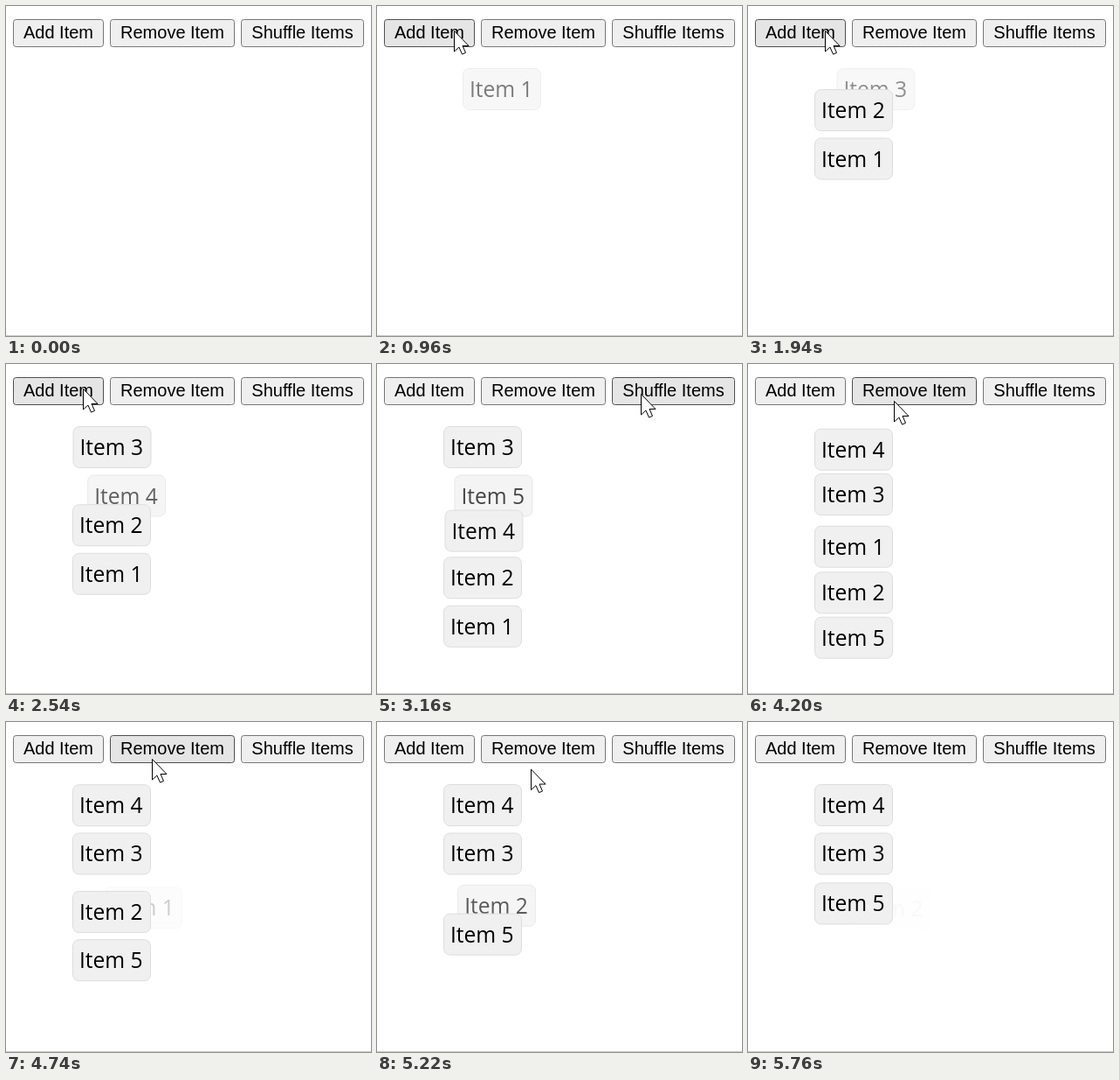
Write an HTML page that moves like this. It is 418 by 377 pixels and loops after 5.82 s.

```html
<!DOCTYPE html>
<html lang="en">
<head>
<meta charset="utf-8">
<title>List transitions</title>
<style>
  html, body { margin: 0; width: 100%; height: 100%; overflow: hidden; background: #fff; }
  svg { display: block; }
  .button text { font: 20px Arial, "Liberation Sans", sans-serif; text-anchor: middle; }
  .button rect { fill: #efefef; stroke: #767676; }
  .button.hover rect { fill: #e5e5e5; stroke: #4f4f4f; }
  .item text { font: 24.6px "Open Sans", sans-serif; }
  .item rect { fill: #f0f0f0; stroke: #ddd; }
</style>
</head>
<body>
<svg id="stage" width="418" height="377" viewBox="0 0 418 377">
  <path d="M0 376.5H418" stroke="#ccc"/>
  <g id="buttons"></g>
  <g id="list"></g>
  <path id="cursor" d="M0 0V23.5L5.4 18.5L9 26.6L13 24.9L9.5 17H16.5Z" fill="#fff" stroke="#000"/>
</svg>
<script>
const LOOP = 5820, TOP = 71, PITCH = 55.5, SHIFT = 45, DROP = 7.5;
const $ = id => document.getElementById(id);

function add(parent, tag, attrs, text = '') {
  const el = document.createElementNS('http://www.w3.org/2000/svg', tag);
  for (const k in attrs) el.setAttribute(k, attrs[k]);
  el.textContent = text;
  return parent.appendChild(el);
}

const buttons = [['Add Item', 8, 104], ['Remove Item', 119, 143], ['Shuffle Items', 269, 141]]
  .map(([label, x, w]) => {
    const el = add($('buttons'), 'g', { class: 'button' });
    add(el, 'rect', { x: x + .5, y: 15.5, width: w - 1, height: 31, rx: 3 });
    add(el, 'text', { x: x + w / 2, y: 37 }, label);
    return { el, x, w };
  });

const items = {};
for (const id of '12345') {
  const el = items[id] = add($('list'), 'g', { class: 'item' });
  add(el, 'rect', { x: .5, y: .5, width: 89, height: 47, rx: 7 });
  add(el, 'text', { x: 8, y: 33 }, 'Item ' + id);
}

// start, duration, list order, leaving item
const actions = [
  [750, 700, '1'],
  [1222, 600, '21'],
  [1783, 600, '321'],
  [2253, 800, '3421'],
  [2730, 1000, '35421'],
  [3350, 1045, '43125'],
  [4268, 944, '43125', '1'],
  [5005, 944, '4325', '2']
];

// time, x, y of the pointer tip
const path = [
  [120, 343, 288], [600, 89, 29], [2780, 89, 29], [3070, 303, 35],
  [3850, 303, 35], [4180, 168, 43], [5180, 168, 43], [5520, 404, 345]
];

const mix = (a, b, p) => a + (b - a) * p;

// cubic-bezier(.25, .1, .25, 1)
function ease(t) {
  if (t >= 1) return 1;
  let lo = 0, hi = 1;
  const curve = (u, a, b) => 3 * a * u * (1 - u) ** 2 + 3 * b * u * u * (1 - u) + u ** 3;
  for (let i = 0; i < 22; i++) {
    const mid = (lo + hi) / 2;
    if (curve(mid, .25, .25) < t) lo = mid; else hi = mid;
  }
  return curve(lo, .1, 1);
}

// Every action restarts the moves from wherever the items are at that moment.
function listAt(t) {
  let now = {}, order = '';
  actions.forEach(([start, dur, ids, leaving], i) => {
    if (t < start) return;
    const next = actions[i + 1];
    const p = ease((Math.min(t, next ? next[0] : LOOP) - start) / dur);
    const state = {};
    let slot = 0;
    for (const id of ids) {
      const y = TOP + PITCH * slot;
      const to = id === leaving ? { x: SHIFT, y: y + DROP, o: 0 } : { x: 0, y, o: 1 };
      const from = now[id] || { x: SHIFT, y, o: 0 };
      state[id] = { x: mix(from.x, to.x, p), y: mix(from.y, to.y, p), o: mix(from.o, to.o, p) };
      if (id !== leaving) slot++;
    }
    now = state;
    order = ids;
  });
  return { now, order };
}

function pointerAt(t) {
  if (t < 120 || t >= 5580) return null;
  const i = path.findIndex(k => k[0] > t);
  if (i < 0) return path[path.length - 1].slice(1);
  const [t0, x0, y0] = path[i - 1], [t1, x1, y1] = path[i];
  const u = (t - t0) / (t1 - t0), p = u * u * (3 - 2 * u);
  return [mix(x0, x1, p), mix(y0, y1, p)];
}

function draw(t) {
  const { now, order } = listAt(t);
  for (const id in items) items[id].setAttribute('opacity', now[id] ? now[id].o : 0);
  for (const id of order) {
    items[id].setAttribute('transform', `translate(${76 + now[id].x} ${now[id].y})`);
    $('list').append(items[id]);
  }
  const tip = pointerAt(t);
  $('cursor').setAttribute('visibility', tip ? 'visible' : 'hidden');
  if (tip) $('cursor').setAttribute('transform', `translate(${tip[0] - .5} ${tip[1] - .5})`);
  for (const { el, x, w } of buttons) {
    const over = tip && tip[0] >= x && tip[0] < x + w && tip[1] >= 15 && tip[1] < 47;
    el.classList.toggle('hover', !!over);
  }
}

// 60 ms steps, with one 80 ms step every 1220 ms
function stepTime(t) {
  const lag = 20 * Math.min(3, Math.max(0, Math.floor((t - 660) / 1220)));
  return Math.floor((t - lag) / 60) * 60 + lag;
}

const begin = performance.now();
function tick() {
  draw(stepTime((performance.now() - begin) % LOOP));
  requestAnimationFrame(tick);
}
tick();
</script>
</body>
</html>
```
